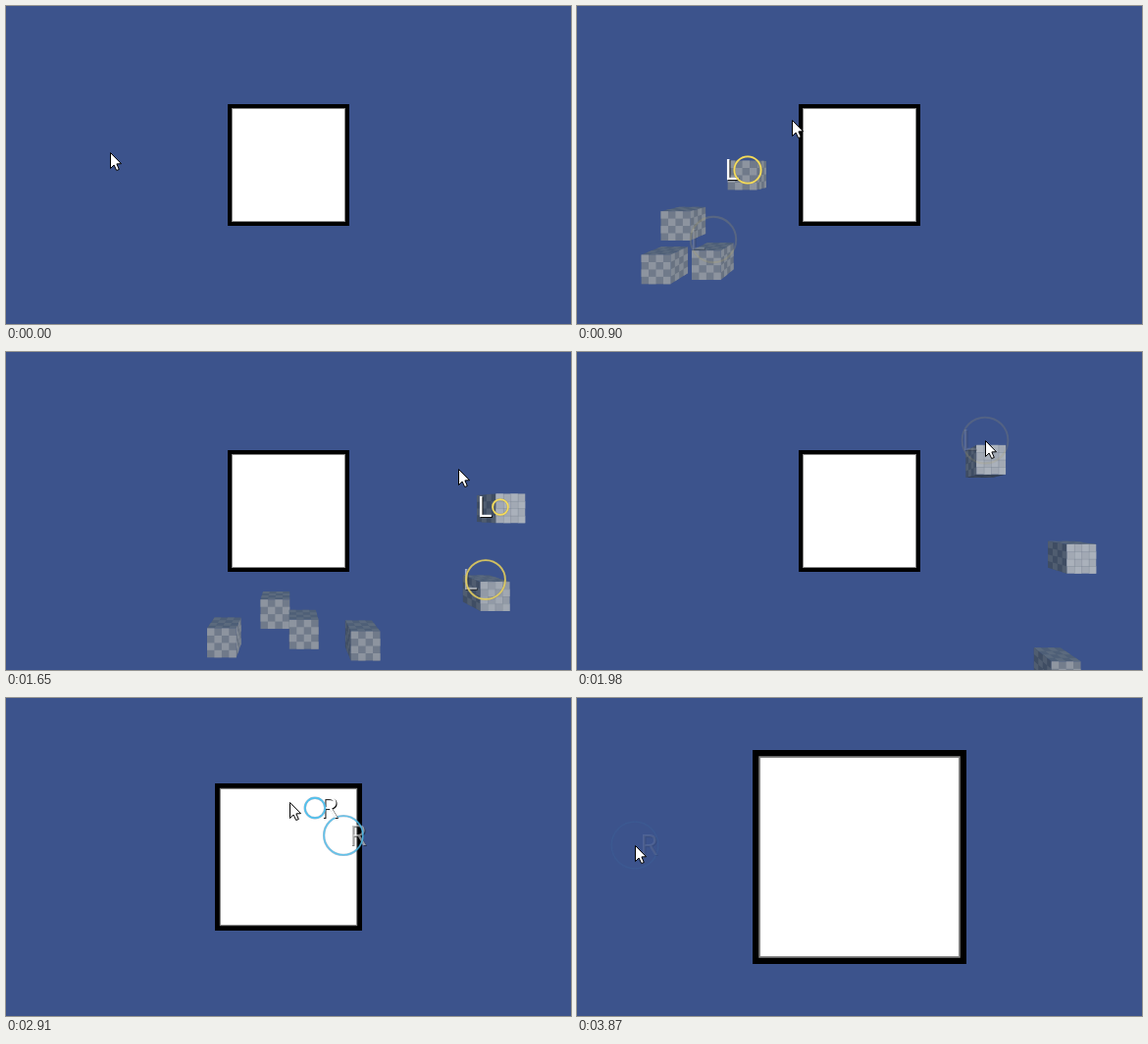
An HTML page with a canvas that plays this animation: 576 px wide and 324 px high, repeating every 4070 ms.

```html
<!DOCTYPE html>
<html lang="en">
<head>
<meta charset="utf-8">
<title>Click demo</title>
<style>
html, body { margin: 0; width: 100%; height: 100%; overflow: hidden; background: #3c538c; }
canvas { display: block; }
</style>
</head>
<body>
<canvas id="stage" width="576" height="324"></canvas>
<script>
const ctx = document.getElementById('stage').getContext('2d');
const LOOP = 4070, STEP = 30, CENTER = { x: 288, y: 162 };
const GRAVITY = 640, DEPTH = 0.048, HALF = 14.9, CELLS = 4;

// Each sweep starts at rest, then clicks at every further point in a steady rhythm.
const leftSweep = {
  label: 'L', start: 237.5, step: 134.5,
  points: [[106, 149], [109, 132], [90, 214], [139, 238], [174, 167], [223, 115],
    [275, 145], [303, 211], [363, 257], [489, 232], [504, 158], [416, 90]]
};
const rightSweep = {
  label: 'R', start: 2043, step: 111,
  points: [[416, 90], [486, 90], [453, 126], [464, 158], [425, 243], [380, 200], [344, 140],
    [315, 112], [283, 108], [256, 143], [251, 189], [230, 209], [140, 232], [92, 190], [59, 150]]
};

const clamp = v => Math.max(0, Math.min(1, v));
const mix = (a, b, k) => a + (b - a) * k;
const mixAll = (from, to, k) => from.map((v, i) => mix(v, to[i], k));
const rgb = c => `rgb(${c.map(Math.round)})`;

// Catmull-Rom curve through the points of the current sweep.
function cursorAt(t) {
  const { start, step, points } = t < rightSweep.start ? leftSweep : rightSweep;
  const last = points.length - 1;
  const k = Math.max(0, Math.min(last, (t - start) / step));
  const i = Math.min(last - 1, Math.floor(k)), u = k - i;
  const [a, b, c, d] = [i - 1, i, i + 1, i + 2].map(n => points[Math.max(0, Math.min(last, n))]);
  return [0, 1].map(n => b[n] + u / 2 * (c[n] - a[n]
    + u * (2 * a[n] - 5 * b[n] + 4 * c[n] - d[n] + u * (3 * (b[n] - c[n]) + d[n] - a[n]))));
}

const clicksOf = ({ label, start, step, points }) =>
  points.slice(1).map(([x, y], i) => ({ label, x, y, time: start + (i + 1) * step }));
const leftClicks = clicksOf(leftSweep);
const rightClicks = clicksOf(rightSweep);

// A right click inside the box makes it grow by a tenth.
const boxHalf = scale => Math.round(61.6 * scale);
function boxScale(t) {
  return rightClicks.filter(c => c.time <= t).reduce((scale, { x, y }) => {
    const reach = Math.max(Math.abs(x - CENTER.x), Math.abs(y - CENTER.y));
    return reach < boxHalf(scale) ? scale * 1.1 : scale;
  }, 1);
}

function drawBox(scale) {
  const centered = (half, color) => {
    ctx.fillStyle = color;
    ctx.fillRect(CENTER.x - half, CENTER.y - half, 2 * half, 2 * half);
  };
  centered(boxHalf(scale), '#000');
  centered(58 * scale, '#888');
  centered(57 * scale, '#fff');
}

function polygon(points, fill) {
  ctx.beginPath();
  points.forEach(([x, y]) => ctx.lineTo(x, y));
  ctx.closePath();
  ctx.fillStyle = fill;
  ctx.fill();
}

function checkerFace([p, q, r, s], dark, light) {
  const at = (i, j) => mixAll(mixAll(p, q, i / CELLS), mixAll(s, r, i / CELLS), j / CELLS);
  polygon([p, q, r, s], rgb(dark));
  for (let j = 0; j < CELLS; j++) {
    for (let i = j % 2; i < CELLS; i += 2) {
      polygon([at(i, j), at(i + 1, j), at(i + 1, j + 1), at(i, j + 1)], rgb(light));
    }
  }
}

function drawCube(x, y) {
  const dx = x - CENTER.x, dy = y - CENTER.y;
  const square = (scale, half) => {
    const cx = CENTER.x + dx * scale, cy = CENTER.y + dy * scale;
    return [[cx - half, cy - half], [cx + half, cy - half], [cx + half, cy + half], [cx - half, cy + half]];
  };
  const f = square(1 + DEPTH, HALF);
  const b = square(1 - DEPTH, HALF * (1 - DEPTH) / (1 + DEPTH));
  const shine = clamp((dx - dy * 1.2) / 150);
  const [left, top] = f[0];

  if (b[0][1] < top) checkerFace([b[0], b[1], f[1], f[0]], [78, 95, 119], [91, 106, 126]);
  if (b[3][1] > f[3][1]) checkerFace([f[3], f[2], b[2], b[3]], [48, 60, 80], [60, 72, 92]);
  if (b[0][0] < left) checkerFace([b[0], f[0], f[3], b[3]], [63, 77, 99], [80, 93, 112]);
  if (b[1][0] > f[1][0]) checkerFace([f[1], b[1], b[2], f[2]], [104, 114, 129], [130, 138, 149]);

  checkerFace(f, mixAll([112, 122, 138], [162, 169, 180], shine),
    mixAll([141, 148, 159], [170, 177, 187], shine));
  ctx.fillStyle = `rgba(100,112,130,${shine * .35})`;
  for (let i = 1; i < CELLS; i++) {
    const offset = i * 2 * HALF / CELLS;
    ctx.fillRect(left + offset, top, .7, 2 * HALF);
    ctx.fillRect(left, top + offset, 2 * HALF, .7);
  }
}

function ring(x, y, radius, color, width, alpha) {
  ctx.globalAlpha = alpha;
  ctx.beginPath();
  ctx.arc(x, y, radius, 0, 2 * Math.PI);
  ctx.strokeStyle = color;
  ctx.lineWidth = width;
  ctx.stroke();
}

function drawClick({ x, y, label }, age) {
  const isLeft = label === 'L';
  const radius = 25 * (1 - (1 - age / .32) ** 1.6);
  const tx = x + (isLeft ? -24 : 5), ty = y + 10;
  const fade = clamp((.29 - age) / .1);

  ctx.globalAlpha = clamp((.29 - age) / .17);
  ctx.font = '30px "Open Sans", sans-serif';
  ctx.fillStyle = '#111';
  ctx.fillText(label, tx + 1, ty + 1);
  ctx.fillStyle = '#fff';
  ctx.fillText(label, tx, ty);

  // The gray rim outlasts the bright ring.
  ring(x, y, radius, isLeft ? '#7d7a6c' : '#3c6f9c', 2.4, fade * .5);
  ring(x, y, radius, isLeft ? '#f5dc5a' : '#4cc4f2', isLeft ? 1.8 : 1.4, fade * fade);
  ctx.globalAlpha = 1;
}

function drawCursor([x, y]) {
  ctx.save();
  ctx.translate(Math.round(x) + .5, Math.round(y) + .5);
  polygon([[0, 0], [0, 16], [3.6, 12.5], [6.2, 18], [8.8, 17], [6.4, 11.4], [11, 11.2]], '#fff');
  ctx.strokeStyle = '#000';
  ctx.lineWidth = 1;
  ctx.stroke();
  ctx.restore();
}

function draw(now) {
  const t = Math.floor(now % LOOP / STEP) * STEP;
  const ageOf = click => (t - click.time) / 1000;
  ctx.fillStyle = '#3c538c';
  ctx.fillRect(0, 0, 576, 324);
  drawBox(boxScale(t));
  for (const c of leftClicks) {
    const age = ageOf(c), y = c.y + GRAVITY * age * age / 2;
    if (age >= 0 && y < 350) drawCube(c.x, y);
  }
  for (const c of [...leftClicks, ...rightClicks]) {
    const age = ageOf(c);
    if (age >= 0 && age < .29) drawClick(c, age);
  }
  drawCursor(cursorAt(t));
}

const start = performance.now();
function tick() {
  draw(performance.now() - start);
  requestAnimationFrame(tick);
}
tick();
</script>
</body>
</html>
```
